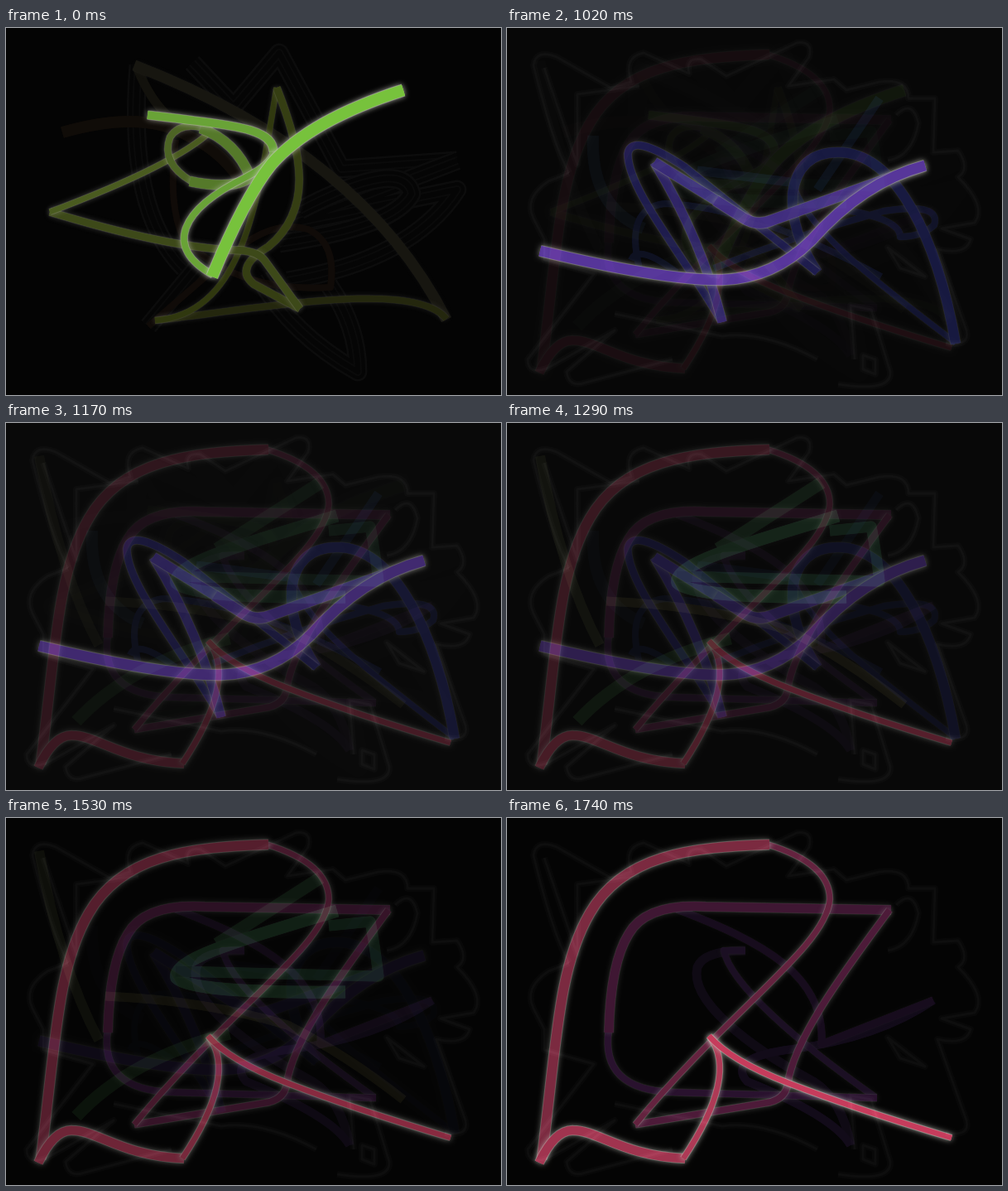
An HTML page with a canvas that plays this animation: 598 px wide and 443 px high, repeating every 2040 ms.

```html
<!DOCTYPE html>
<html>
<head>
<meta charset="utf-8">
<style>
html, body { margin: 0; width: 100%; height: 100%; overflow: hidden; background: #040404; }
canvas { display: block; }
</style>
</head>
<body>
<canvas id="stage" width="598" height="443"></canvas>
<script>
const W = 598, H = 443, LOOP = 2040, CUT = 930, FADE_END = 1740, STEP = 30;
const ctx = document.getElementById('stage').getContext('2d');

// Strokes are ordered from oldest to newest: colour, width, path, glow.
const green = [
  ['#100c08', 14, 'M68 126Q165 98 220 130Q265 150 290 195', 0],
  ['#100b08', 8, 'M205 135Q195 215 215 255Q280 320 392 313Q400 260 365 243Q320 230 270 275L172 360', 0],
  ['#12110c', 11, 'M158 47Q175 90 200 110', 0],
  ['#171610', 13, 'M155 45C310 105 455 200 532 352', .04],
  ['#24270e', 8, 'M532 351C495 305 330 335 180 353', .12],
  ['#30380f', 7, 'M180 353C290 345 305 200 327 72', .14],
  ['#353e13', 9, 'M327 72C360 155 370 220 317 264Q275 289 299 309L355 339', .18],
  ['#3d4919', 9, 'M355 339L312 280Q302 268 275 268Q195 265 53 222', .25],
  ['#4a5b20', 7, 'M53 222Q205 165 248 124', .32],
  ['#4d6425', 8, 'M248 124Q212 110 198 132Q187 163 224 185', .35],
  ['#55792a', 12, 'M222 185Q275 196 295 180Q278 137 235 121', .45],
  ['#69a337', 10, 'M171 105L205 109C265 117 325 120 323 150', .7],
  ['#69a337', 8, 'M323 150Q321 164 290 180C210 219 190 265 250 298', .7],
  ['#77c23c', 14, 'M249 300Q288 205 321 164Q368 111 480 75', .9]
];
const purple = [
  ['#04080d', 14, 'M104 130Q100 215 165 242', 0],
  ['#050b17', 11, 'M450 85L375 195M230 172L342 186', 0],
  ['#080c22', 8, 'M150 280Q158 260 205 295M160 290Q142 218 190 212Q295 215 452 300', 0],
  ['#0b0e2a', 8, 'M250 290Q350 250 455 221Q525 210 516 238Q500 252 475 252Q475 231 410 220', .06],
  ['#0e1136', 7, 'M542 380C450 310 365 245 348 195', .1],
  ['#15174a', 12, 'M542 381C520 255 470 150 400 150Q352 150 345 200Q342 245 375 295', .18],
  ['#1d1a5a', 9, 'M375 295L300 236L215 168Q150 125 146 152C146 195 210 270 258 352', .28],
  ['#33257c', 11, 'M260 355Q235 255 178 162', .38],
  ['#402d92', 12, 'M178 162L254 209', .45],
  ['#4b319c', 13, 'M252 208L285 229Q302 240 320 232L505 166', .5],
  ['#673cc0', 13, 'M40 269Q190 305 260 304Q322 302 368 256Q430 186 505 166', .85]
];
const red = [
  ['#0b0610', 11, 'M415 395Q405 340 370 318C290 275 220 220 230 180Q238 160 288 160', 0],
  ['#0e0715', 10, 'M515 220Q450 265 345 279Q265 289 290 318Q395 360 415 395', 0],
  ['#130819', 9, 'M205 110C310 150 385 190 380 273L515 220', .03],
  ['#170b1f', 8, 'M445 337C350 270 270 200 262 160L288 160', .06],
  ['#250e2a', 8, 'M123 255Q112 328 200 331L447 338', .14],
  ['#3b132f', 11, 'M464 111L240 107Q168 103 147 140Q125 175 123 259', .2],
  ['#491735', 8, 'M155 370L318 343Q336 338 339 322C346 265 415 175 462 111', .3],
  ['#601f3b', 7, 'M315 32Q390 55 390 98C386 155 270 230 155 370', .4],
  ['#77263c', 12, 'M42 412C60 270 62 180 100 115C140 45 220 35 317 32', .5],
  ['#9c304b', 11, 'M39 416Q58 376 80 377C110 377 140 408 215 411', .65],
  ['#aa3652', 7, 'M213 411Q280 310 245 264', .75],
  ['#c23858', 7, 'M244 263Q270 293 340 320Q420 351 537 386', .85]
];
const leaf = [
  ['#12130a', 12, 'M40 40Q65 180 112 268', 0],
  ['#16150a', 11, 'M120 215Q240 220 340 250Q410 285 480 340', 0],
  ['#0c1a0c', 15, 'M85 360Q150 290 270 260', 0],
  ['#112415', 15, 'M255 152L380 72', .03],
  ['#16331f', 15, 'M400 112C290 145 200 170 206 193Q225 212 410 210', .05],
  ['#122a1a', 13, 'M205 185L450 191Q445 150 440 125L390 130', .03]
];
const greenGhosts = [
  'M160 45Q145 220 215 290', 'M225 42L275 95L330 30L405 170L545 160',
  'M545 160L350 235L545 195Q490 280 340 305', 'M355 220Q480 155 490 200Q470 240 330 260',
  'M305 300Q345 370 425 415Q425 360 390 310', 'M172 360L230 290'
];
const rim = [
  'M75 175Q55 140 32 45Q35 25 60 35L125 72L150 65Q140 35 165 30L220 55Q215 35 235 38L265 58L350 18Q370 15 365 35L340 70L395 62L410 75L450 65Q485 60 485 85L517 85L515 150L545 148Q560 170 545 180Q580 215 565 235L525 242L560 255Q555 275 520 267L555 365Q560 385 530 380',
  'M75 175L50 185Q20 205 32 230L45 255L45 280L105 297L25 400Q25 420 50 410L130 365L72 415Q75 435 95 428L200 400M400 430Q465 440 463 415L440 340L415 335L420 400',
  'M45 48L85 165L85 80L160 70M470 105Q490 85 497 115Q490 155 460 160M430 395L445 400L445 418L430 412Z',
  'M130 345L260 372Q310 365 375 400M460 265L505 300L475 290Z'
];

function makeLayer(draw) {
  const layer = document.createElement('canvas');
  layer.width = W;
  layer.height = H;
  const g = layer.getContext('2d');
  g.lineJoin = 'round';
  draw(g);
  return layer;
}

function trace(g, color, width, path) {
  g.strokeStyle = color;
  g.lineWidth = width;
  g.stroke(new Path2D(path));
}

// Each stroke sits on a thin pale edge that bleeds into a soft halo.
function drawing(strokes, ghosts = []) {
  return makeLayer(g => {
    for (const path of ghosts) {
      trace(g, '#0c0c0c', 23, path);
      trace(g, '#050505', 18, path);
      trace(g, '#0a0a0a', 10, path);
      trace(g, '#050505', 6, path);
    }
    for (const [color, width, path, glow] of strokes) {
      g.shadowBlur = 7;
      g.shadowColor = `rgba(205,205,195,${glow})`;
      trace(g, color, width, path);
      g.shadowBlur = 0;
      trace(g, `rgba(205,205,195,${glow * .5})`, width + 1.5, path);
      trace(g, color, width - .5, path);
    }
  });
}

const greenLayer = drawing(green, greenGhosts);
const purpleLayer = drawing(purple);
const redLayer = drawing(red);
const leafLayer = drawing(leaf);
const rimLayer = makeLayer(g => {
  for (const path of rim) {
    trace(g, 'rgba(255,255,255,.018)', 8, path);
    trace(g, 'rgba(255,255,255,.025)', 3, path);
  }
});

// Opacity over the time since the cut, as [ms, value] pairs.
const fades = [
  [greenLayer, [[0, 0], [90, .08], [240, .02], [360, 0]]],
  [leafLayer, [[0, 0], [90, .1], [240, .35], [360, .55], [600, .55], [810, 0]]],
  [purpleLayer, [[0, 1], [90, .76], [240, .53], [360, .36], [600, .09], [810, 0]]],
  [redLayer, [[0, 0], [90, .12], [240, .31], [360, .4], [600, .68], [810, 1]]]
];
const lift = [[0, 4], [90, 7], [240, 9], [360, 8], [600, 4], [810, 4]];

function valueAt(keys, t) {
  const next = keys.findIndex(([time]) => time > t);
  if (next < 0) return keys[keys.length - 1][1];
  const [t0, v0] = keys[next - 1], [t1, v1] = keys[next];
  return v0 + (v1 - v0) * (t - t0) / (t1 - t0);
}

function render(now) {
  const time = now % LOOP;
  const t = Math.floor((Math.min(time, FADE_END) - CUT) / STEP) * STEP;
  const grey = t < 0 ? 4 : Math.round(valueAt(lift, t));
  ctx.globalCompositeOperation = 'source-over';
  ctx.globalAlpha = 1;
  ctx.fillStyle = `rgb(${grey},${grey},${grey})`;
  ctx.fillRect(0, 0, W, H);
  if (t < 0) {
    ctx.drawImage(greenLayer, 0, 0);
  } else {
    ctx.drawImage(rimLayer, 0, 0);
    ctx.globalCompositeOperation = 'lighter';
    for (const [layer, keys] of fades) {
      ctx.globalAlpha = valueAt(keys, t);
      ctx.drawImage(layer, 0, 0);
    }
  }
  requestAnimationFrame(render);
}
render(0);
</script>
</body>
</html>
```
